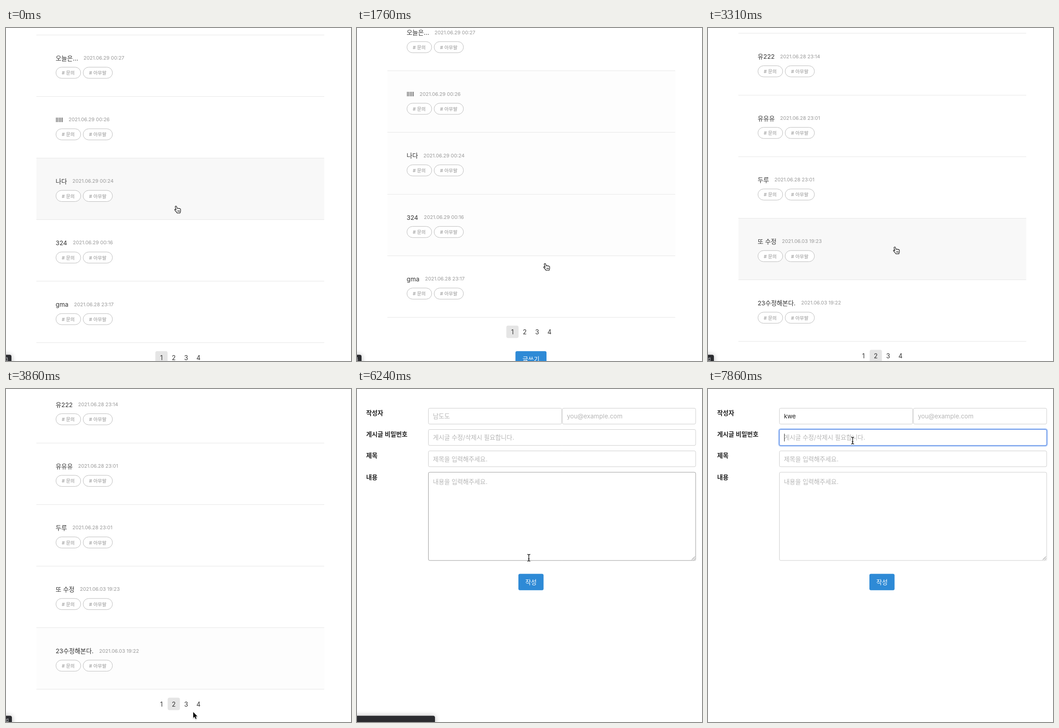
These frames come from a looping animation (761x736 px, 8 s). An HTML page with a canvas:

```html
<!DOCTYPE html>
<html lang="ko">
<head>
<meta charset="utf-8">
<title>게시판</title>
<style>
  html, body { margin: 0; width: 100%; height: 100%; overflow: hidden; background: #fff; }
  canvas { display: block; }
</style>
</head>
<body>
<canvas id="stage" width="761" height="736"></canvas>
<script>
const ctx = document.getElementById('stage').getContext('2d');
const LOOP = 8000, ROW = 136.15, LEFT = 67, WIDTH = 635, TOP = 14.6;
const FONT = 'Inter, "Noto Sans CJK KR", sans-serif';
const BLUE = '#2e8ad6';

// Each post: title, date, x of the date
const PAGES = {
  1: [['오늘은...', '2021.06.29 00:27', 171], ['lllll', '2021.06.29 00:26', 138],
      ['나다', '2021.06.29 00:24', 146.5], ['324', '2021.06.29 00:16', 147.5],
      ['gma', '2021.06.28 23:17', 150]],
  2: [['유222', '2021.06.28 23:14', 159], ['유유유', '2021.06.28 23:01', 159],
      ['두루', '2021.06.28 23:01', 146.5], ['또 수정', '2021.06.03 19:23', 163],
      ['23수정해본다.', '2021.06.03 19:22', 205.5]],
  4: [['Hello', '2021.05.31 15:54', 155], ['안녕?', '2021.05.31 15:54', 153.5]]
};

const FIELDS = [
  { x: 157, y: 42, w: 295, h: 36, hint: '남도도' },
  { x: 452.5, y: 42, w: 295, h: 36, hint: 'you@example.com' },
  { x: 157, y: 89, w: 590.5, h: 36.3, hint: '게시글 수정/삭제시 필요합니다.' },
  { x: 157, y: 136.3, w: 590.5, h: 36, hint: '제목을 입력해주세요.' },
  { x: 157, y: 183.5, w: 590.5, h: 196, hint: '내용을 입력해주세요.', textY: 210 }
];
const LABELS = ['작성자', '게시글 비밀번호', '제목', '내용'];

// Tracks: [start, end, value]
const POINTER_START = [375, 394];
const POINTER = [
  [100, 480, [411, 226]],
  [1450, 1740, [421, 500]],
  [1700, 1970, [372, 666]],
  [2220, 2500, [408.5, 468]],
  [3030, 3070, [412, 469]],
  [3240, 3700, [413, 714]],
  [3870, 4170, [424, 704]],
  [4400, 4880, [452, 502]],
  [5340, 5550, [374, 368]],
  [5860, 5930, [379, 373]],
  [6520, 7280, [300, 62]],
  [7560, 7720, [319, 114]]
];
const SCROLL = [
  [100, 480, [46]], [860, 1170, [56.5]], [2300, 2300, [0]],
  [3240, 3600, [32]], [4430, 4430, [0]]
];
// Status bubble: [start, end of hold, end of fade, text, width]
const BUBBLES = [
  [0, 250, 250, '3', 12], [250, 1800, 1800, '4', 10], [1800, 1840, 1970, '', 172],
  [2240, 2440, 2440, '4', 10], [2440, 2480, 2670, '', 172],
  [3260, 3960, 3960, 'd', 13], [3960, 4020, 4170, '', 172],
  [6170, 6520, 6720, '', 172]
];
const TYPED = [['k', 7440], ['w', 7510], ['e', 7580]];
const FOCUS_NAME = 7380, FOCUS_PASSWORD = 7860, FORM = 6100;

const clamp = v => Math.min(1, Math.max(0, v));
const smooth = u => u * u * (3 - 2 * u);

function track(start, keys, t) {
  let value = start;
  for (const [from, to, goal] of keys) {
    if (t < from) break;
    const u = to > from ? smooth(clamp((t - from) / (to - from))) : 1;
    value = value.map((v, i) => v + (goal[i] - v) * u);
  }
  return value;
}

const pointerAt = t => track(POINTER_START, POINTER, t);
const scrollAt = t => track([0], SCROLL, t)[0];
const isLoading = t => (t >= 2300 && t < 2780) || (t >= 4430 && t < 4880);
const pageAt = t => t < 2300 ? 1 : t < 4430 ? 2 : 4;
const inside = (x, y, b) => x >= b.x && x <= b.x + b.w && y >= b.y && y <= b.y + b.h;

function hoveredRow(t) {
  if (isLoading(t) || t >= FORM) return -1;
  const [x, y] = pointerAt(t);
  const row = Math.floor((y - TOP + scrollAt(t)) / ROW);
  return x > LEFT && x < LEFT + WIDTH && row < PAGES[pageAt(t)].length ? row : -1;
}

// Share of the last 400 ms that the pointer spent on the row
function hoverLevel(row, t) {
  let hits = 0;
  for (let k = 0; k < 20; k++) {
    const past = Math.max(0, t - k * 20);
    if (pageAt(past) === pageAt(t) && hoveredRow(past) === row) hits++;
  }
  return hits / 20;
}

function text(str, x, y, size, color, align = 'left', weight = 400) {
  ctx.font = `${weight} ${size}px ${FONT}`;
  ctx.fillStyle = color;
  ctx.textAlign = align;
  ctx.fillText(str, x, y);
}

function box(x, y, w, h, r, fill, stroke, line = 1) {
  ctx.beginPath();
  ctx.roundRect(x, y, w, h, r);
  if (fill) { ctx.fillStyle = fill; ctx.fill(); }
  if (stroke) { ctx.strokeStyle = stroke; ctx.lineWidth = line; ctx.stroke(); }
}

function button(label, x, y, w) {
  box(x, y, w, 36.4, 3.5, BLUE);
  text(label, x + w / 2, y + 23.2, 13.6, '#fff', 'center');
}

function divider(y) {
  ctx.fillStyle = '#e6e6e6';
  ctx.fillRect(LEFT, Math.round(y), WIDTH, 1);
}

function drawPost([title, date, dateX], y, level) {
  ctx.fillStyle = `rgba(248,248,248,${level})`;
  ctx.fillRect(LEFT, Math.round(y), WIDTH, ROW);
  text(title, 109.5, y + 57, 13.7, '#333');
  text(date, dateX, y + 55.4, 10.9, '#999');
  box(110.2, y + 72, 54.6, 24.6, 12.3, '#fff', '#bbb');
  box(170.2, y + 72, 64.6, 24.6, 12.3, '#fff', '#bbb');
  text('# 문의', 123, y + 88.7, 10.4, '#8f8f8f');
  text('# 아무말', 183.3, y + 88.7, 10.4, '#8f8f8f');
}

function drawList(t) {
  const page = pageAt(t), posts = PAGES[page], top = TOP - scrollAt(t);
  posts.forEach((post, i) => drawPost(post, top + i * ROW, hoverLevel(i, t)));
  for (let i = 0; i <= posts.length; i++) divider(top + i * ROW);
  const end = top + posts.length * ROW;
  for (let n = 1; n <= 4; n++) {
    const x = 342.9 + (n - 1) * 27.2;
    if (n === page) box(x - 13.5, end + 19, 27, 27.3, 4, '#e5e5e5');
    text(n, x, end + 38.2, 14, '#333', 'center');
  }
  button('글쓰기', 349.5, end + 75.3, 68.5);
}

function drawLoading(t) {
  const angle = Math.PI / 2 + (t - 2660) / 1000 * Math.PI * 2;
  ctx.lineWidth = 4.5;
  const arc = (from, to, color) => {
    ctx.beginPath();
    ctx.arc(384, 178, 19.4, from, to);
    ctx.strokeStyle = color;
    ctx.stroke();
  };
  arc(0, Math.PI * 2, '#f1f2fb');
  arc(angle - Math.PI / 4, angle + Math.PI / 4, '#cdd6f9');
  button('글쓰기', 349.5, 388.3, 68.5);
}

function drawCaret(x, y) {
  ctx.fillStyle = '#222';
  ctx.fillRect(x, y, 1, 17);
}

function drawForm(t) {
  const [px, py] = pointerAt(t);
  const focus = t >= FOCUS_PASSWORD ? 2 : t >= FOCUS_NAME ? 0 : -1;
  const typed = TYPED.filter(([, at]) => t >= at).map(([c]) => c).join('');
  LABELS.forEach((label, i) => text(label, 20.3, 58 + i * 47.2, 13.6, '#222', 'left', 600));
  FIELDS.forEach((f, i) => {
    const focused = i === focus, hovered = inside(px, py, f);
    if (focused) box(f.x, f.y, f.w, f.h, 3.5, null, '#a9c7f8', 4);
    box(f.x + .5, f.y + .5, f.w - 1, f.h - 1, 3, '#fff',
      focused ? '#4379de' : hovered ? '#999' : '#ccc');
    const value = i === 0 ? typed : '';
    const y = f.textY || f.y + 23.3;
    text(value || f.hint, f.x + 10.5, y, 13.6, value ? '#222' : '#b6b6b6');
    if (focused) drawCaret(f.x + 11 + (value ? ctx.measureText(value).width : 0), y - 13.5);
  });
  ctx.beginPath();
  ctx.moveTo(738.5, 377.5); ctx.lineTo(745.5, 370.5);
  ctx.moveTo(742.5, 377.5); ctx.lineTo(745.5, 374.5);
  ctx.strokeStyle = '#666';
  ctx.lineWidth = 1;
  ctx.stroke();
  button('작성', 356, 408.4, 55.5);
}

function drawBubble(t) {
  const bubble = BUBBLES.find(([from, , end]) => t >= from && t < end);
  if (!bubble) return;
  const [, hold, end, label, width] = bubble;
  ctx.save();
  ctx.globalAlpha = t < hold ? 1 : clamp((end - t) / (end - hold));
  ctx.shadowColor = 'rgba(0,0,0,.3)';
  ctx.shadowBlur = 12;
  box(-20, 722.3, width + 20, 30, 4, '#2b2c30');
  ctx.shadowColor = 'transparent';
  text(label, width - 7, 736, 11, '#c4c5c8', 'right');
  ctx.restore();
}

const HAND = new Path2D('M-1.8 1.2C-1.8-.7 1-.8 1.4.8L2.6 5C3.2 3.9 5 4 5.3 5.2C6 4.2 7.6 4.5 7.9 5.7' +
  'C8.8 5 10 5.6 10.1 7L10.2 10C10.2 12 9.2 12.6 9 14.8H2.2C1.8 13-1 11-2.8 8.5C-3.8 7-2 6-.9 7.2L.2 8.3Z');
const HAND_LINES = new Path2D('M3.9 9V12.3M5.8 9V12.3M7.6 9V12.3');
const ARROW = new Path2D('M0 0V13L3 10.3L5.2 15.2L7.3 14.3L5.2 9.5H9.1Z');
const BEAM = new Path2D('M-3.2-7.5Q0-7.5 0-5.5Q0-7.5 3.2-7.5M0-5.5V5.5M-3.2 7.5Q0 7.5 0 5.5Q0 7.5 3.2 7.5M-1.6 2.5H1.6');

function pointerKind(t, x, y) {
  if (t >= FORM) return FIELDS.some(f => inside(x, y, f)) ? 'beam' : 'arrow';
  if (isLoading(t)) return t < 3000 ? 'hand' : 'arrow';
  if (hoveredRow(t) >= 0) return 'hand';
  const end = TOP - scrollAt(t) + PAGES[pageAt(t)].length * ROW;
  const targets = [{ x: 329, y: end + 19, w: 109, h: 27.3 }, { x: 349.5, y: end + 75, w: 68.5, h: 36.5 }];
  return targets.some(b => inside(x, y, b)) ? 'hand' : 'arrow';
}

function paint(path, line, stroke, fill) {
  ctx.lineWidth = line;
  ctx.strokeStyle = stroke;
  ctx.stroke(path);
  if (fill) { ctx.fillStyle = fill; ctx.fill(path); }
}

function drawPointer(t) {
  const [x, y] = pointerAt(t), kind = pointerKind(t, x, y);
  ctx.save();
  ctx.translate(x, y);
  ctx.lineJoin = 'round';
  if (kind === 'hand') {
    paint(HAND, 2.6, '#fff', '#fff');
    paint(HAND, 1.2, '#111');
    paint(HAND_LINES, .9, '#111');
  } else if (kind === 'beam') {
    paint(BEAM, 3, 'rgba(255,255,255,.8)');
    paint(BEAM, 1.4, '#111');
  } else {
    ctx.shadowColor = 'rgba(0,0,0,.3)';
    ctx.shadowBlur = 2;
    ctx.shadowOffsetY = 1;
    paint(ARROW, 1.8, '#fff');
    ctx.shadowColor = 'transparent';
    ctx.fillStyle = '#000';
    ctx.fill(ARROW);
  }
  ctx.restore();
}

function render(now) {
  const t = now % LOOP;
  ctx.fillStyle = '#fff';
  ctx.fillRect(0, 0, 761, 736);
  if (t >= FORM) drawForm(t);
  else if (isLoading(t)) drawLoading(t);
  else drawList(t);
  drawBubble(t);
  drawPointer(t);
}

let origin;
function tick(now) {
  origin ??= now;
  render(now - origin);
  requestAnimationFrame(tick);
}
render(0);
requestAnimationFrame(tick);
</script>
</body>
</html>
```
